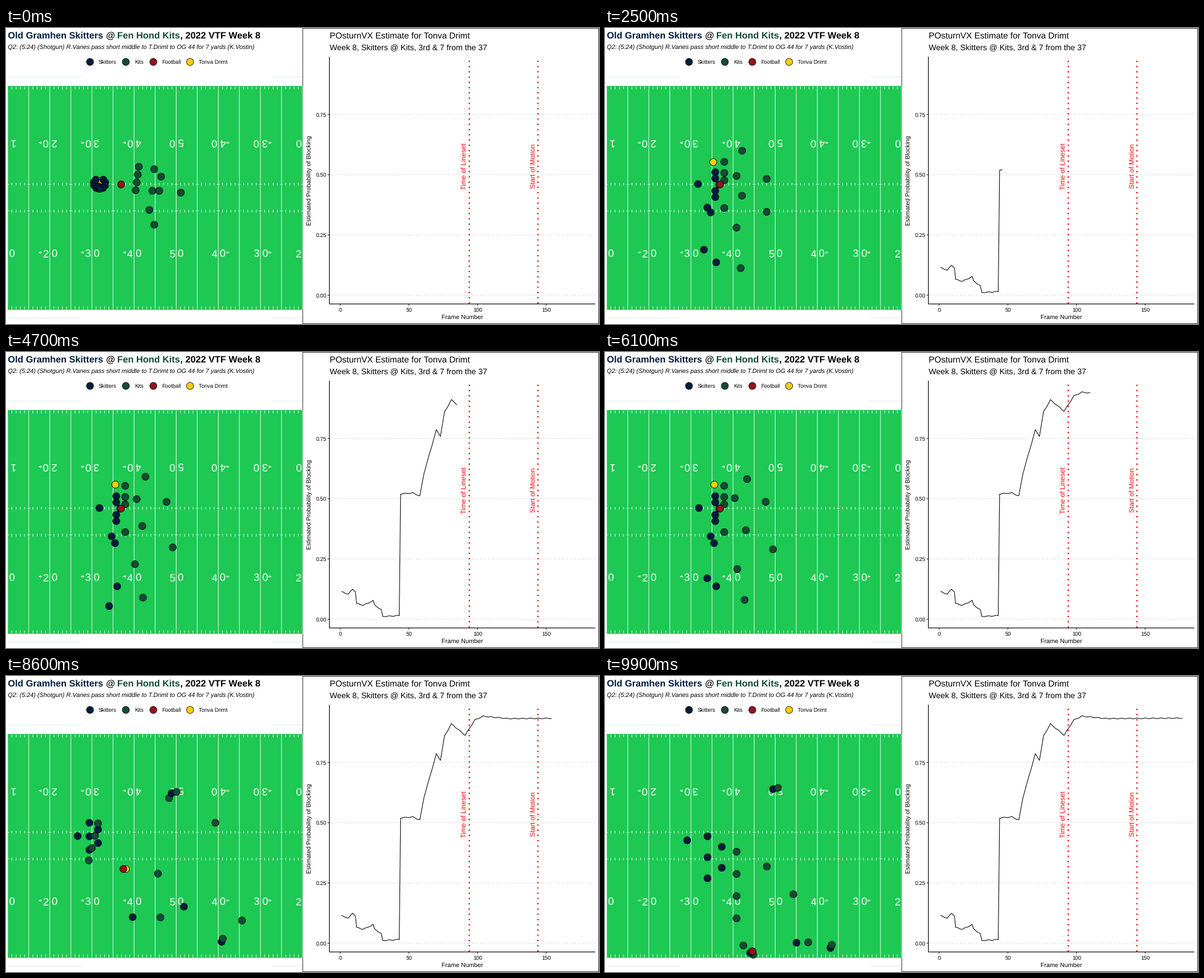
Write a matplotlib script that moves like this. It is 960 px wide and 480 px high and loops after 10000 ms.

```python
import numpy as np
import matplotlib.pyplot as plt
from matplotlib.animation import FuncAnimation
from matplotlib.patches import Polygon, Rectangle

W, H, DPI = 960, 480, 80
PT = 72 / DPI  # points per pixel
FRAMES = 100
F = np.arange(FRAMES)

NAVY, GREEN, RED, GOLD = "#001d3d", "#134b37", "#92141c", "#ffcc0a"
TURF, CHALK = "#1dc853", "#d9f7e2"

plt.rcParams["font.family"] = "Liberation Sans"
plt.rcParams["text.hinting"] = "none"
plt.rcParams["path.snap"] = False

fig = plt.figure(figsize=(W / DPI, H / DPI), dpi=DPI, facecolor="white")
ax = fig.add_axes([0, 0, 1, 1])
ax.set_xlim(0, W)
ax.set_ylim(H, 0)
ax.axis("off")


def text(x, y, s, px, color="black", ha="left", **kw):
    ax.text(x, y, s, fontsize=px * PT, color=color, ha=ha, va="baseline",
            rotation_mode="anchor", **kw)


def line(x, y, color="black", px=1.0, z=2, **kw):
    return ax.plot(x, y, color=color, lw=px * PT, zorder=z,
                   solid_capstyle="butt", **kw)[0]


def segments(x0, y0, x1, y1):
    """Many separate chalk strokes as one broken line."""
    x0, y0, x1, y1 = np.broadcast_arrays(x0, y0, x1, y1)
    gap = np.full(x0.shape, np.nan)
    line(np.column_stack([x0, x1, gap]).ravel(),
         np.column_stack([y0, y1, gap]).ravel(), CHALK)


def dots(xy, colors, z):
    x, y = np.transpose(xy)
    return ax.scatter(x, y, s=(11.4 * PT) ** 2, c=colors, edgecolors="black",
                      linewidths=0.75 * PT, zorder=z)


# ---------------------------------------------------------------- field
TOP, BOTTOM, LEFT, MID, YARD = 94, 457, 2.7, 275.5, 6.82


def draw_field():
    ax.add_patch(Rectangle((LEFT, TOP), 480 - LEFT, BOTTOM - TOP, fc=TURF, lw=0))
    for y in (79.5, 470.5):
        line([3, 122], [y, y], "#dcefee")
        line([430, 480], [y, y], "#dcefee")

    fives = MID + 5 * YARD * np.arange(-8, 7)
    segments(fives, TOP, fives, BOTTOM)
    yards = MID + YARD * np.array([k for k in range(-39, 30) if k % 5])
    for y in (TOP + 1, 251, 294.7, BOTTOM - 5.5):
        segments(yards, y, yards, y + 4.5)
    for y in (253.5, 296.5):
        segments(fives - 2.2, y, fives + 2.2, y)

    for k in range(-4, 4):
        x, s = MID + 10 * YARD * k, np.sign(k)
        digits = str(5 - abs(k)) + "0"
        for base, tip, turn in ((179.5, 186, 180), (371.5, 364, 0)):
            for dx, digit in zip((-6.8, 6.8), digits[::-1] if turn else digits):
                if 0 < x + dx < 480:
                    text(x + dx, base, digit, 17, "white", "center", rotation=turn)
            if k and 20 < x < 460:
                ax.add_patch(Polygon([(x + 18.5 * s, tip), (x + 13.5 * s, tip - 1.7),
                                      (x + 13.5 * s, tip + 1.7)], fc="white", lw=0,
                                     zorder=3))


def draw_header():
    bold = dict(fontweight="bold")
    text(3, 18, "Old Gramhen Skitters", 15, NAVY, **bold)
    text(161.4, 18, "@", 15, **bold)
    text(180.2, 18, "Fen Hond Kits", 15, GREEN, **bold)
    text(282.5, 18, ", 2022 VTF Week 8", 15, **bold)
    text(3, 34, "Q2: (5:24) (Shotgun) R.Vanes pass short middle to T.Drimt"
                " to OG 44 for 7 yards (K.Vostin)", 10, fontstyle="italic")
    keys = [(136, "Skitters", NAVY), (194, "Kits", GREEN),
            (238.5, "Football", RED), (298, "Tonva Drimt", GOLD)]
    dots([(x, 55) for x, _, _ in keys], [c for _, _, c in keys], 4)
    for x, name, _ in keys:
        text(x + 14, 58, name, 8.8)


# ---------------------------------------------------------------- chart
def cx(d):
    return 541 + 2.2232 * d


def cy(p):
    return 433.3 - 390.8 * p


def draw_chart():
    ax.add_patch(Rectangle((480.5, 0.5), 479, 479, fc="white", ec="#444444",
                           lw=PT, zorder=1))
    text(523.5, 17, "POsturnVX Estimate for Tonva Drimt", 14)
    text(523.5, 36, "Week 8, Skitters @ Kits, 3rd & 7 from the 37", 13)

    dotted = dict(linestyle=(0, (1, 3)))
    for p in (0, 0.25, 0.5, 0.75):
        line([523.5, 954], [cy(p)] * 2, "#bebebe", 1.07, **dotted)
        line([520.5, 523.5], [cy(p)] * 2, "#333333", 1.07)
        text(519, cy(p) + 3.3, f"{p:.2f}", 9, ha="right")
    for d in (0, 50, 100, 150):
        line([cx(d)] * 2, [447.5, 450.5], "#333333", 1.07)
        text(cx(d), 460, str(d), 9, ha="center")
    line([523.5, 523.5, 954], [46.5, 447.5, 447.5], px=1.07)
    text(738.7, 472, "Frame Number", 10, ha="center")
    text(494, 247, "Estimated Probability of Blocking", 10, ha="center", rotation=90)

    for d, label in ((94, "Time of Lineset"), (144, "Start of Motion")):
        line([cx(d)] * 2, [447, 53], "red", 2.13, 3, **dotted)
        text(cx(d) - 3.7, 224, label, 11.1, "red", "center", rotation=90)


def estimate():
    """Plateaus, jumps and climbs of the model output, with a slight wobble."""
    turns = [(1, .114), (6, .104), (9, .125), (11, .115), (12, .065), (17, .058),
             (24, .077), (25, .06), (30, .038), (31, .011), (43, .015), (44, .52),
             (53, .524), (58, .511), (61, .605), (70, .785), (73, .76), (76, .86),
             (81, .91), (91, .863), (98, .926), (104, .942), (122, .932), (177, .934)]
    d = np.arange(1, 178)
    return cx(d), cy(np.interp(d, *zip(*turns)) + 0.0015 * np.sin(1.1 * d))


# ---------------------------------------------------------------- motion
SNAP, DROP, CATCH, END = 67, 77, 86, 99


def ease(f0, f1):
    u = np.clip((F - f0) / (f1 - f0), 0, 1)[:, None]
    return u * u * (3 - 2 * u)


def glide(pts):
    """Monotone cubic from the snap through the drop and catch to the end."""
    keys, p = np.array([SNAP, DROP, CATCH, END]), np.array(pts, float)
    h = np.diff(keys)[:, None]
    d = np.diff(p, axis=0) / h
    a, b = d[:-1], d[1:]
    same = a * b > 0
    inner = np.where(same, 2 * a * b / np.where(same, a + b, 1), 0)
    m = np.vstack([0 * d[:1], inner, d[-1:]])
    i = np.clip(np.searchsorted(keys, F, "right") - 1, 0, len(h) - 1)
    u = (np.maximum(F, SNAP) - keys[i])[:, None] / h[i]
    smooth = u * u * (3 - 2 * u)
    return (p[i] + (p[i + 1] - p[i]) * smooth
            + h[i] * u * (1 - u) * ((1 - u) * m[i] - u * m[i + 1]))


paths, colors = [], []


def add(color, path):
    paths.append(path)
    colors.append(color)
    return path


def line_up(start, stance, walk=(0, 16), shift=(0, 0), when=(34, 61)):
    start, stance = np.array(start, float), np.array(stance, float)
    return start + (stance - start) * ease(*walk) + np.array(shift) * ease(*when)


def player(color, start, stance, *route, **kw):
    """Walk to the stance, maybe shift, then run a three-point route."""
    pre = line_up(start, stance, **kw)
    run = glide([pre[SNAP], *route])
    return add(color, np.where(F[:, None] < SNAP, pre, run))


def shadow(start, stance, man, offset, **kw):
    """Man coverage: close on a receiver until the catch, then stay with him."""
    pre = line_up(start, stance, **kw)
    u = np.clip((F - SNAP) / (CATCH - SNAP), 0, 1)[:, None] ** 2
    return add(GREEN, pre + (man + offset - pre) * u)


def huddle(i):
    """Spot i of nine on a ring open toward the top."""
    a = np.radians(-50 + 35 * i)
    return 151.5 + 9.5 * np.cos(a), 252.5 + 8.5 * np.sin(a)


def blocker(k):
    """Offensive lineman k = -2..2, counted from the center."""
    odd = k % 2
    player(NAVY, huddle(k + 2), (185 if k == 0 else 178.5, 254 + 10.1 * k),
           (157 + 6 * odd, 254 + 8.5 * k), (135 + 14 * odd, 260 + 11 * k),
           (166 + 23 * odd, 294 + 17 * k))


def rusher(j, y):
    """Defensive lineman j = 0..3, set at height y."""
    player(GREEN, (215 - 1.7 * j, 225 + 12.7 * j), (193, y),
           (172 - 3 * j, 238 + 11 * j), (149 - 5 * j, 239 + 20 * j),
           (213, 285 + 36 * j), walk=(0, 26))


def ball_path(passer, catcher):
    spot = np.array([186.3, 253.7])
    held = spot + (passer - spot) * np.clip((F - SNAP) / 4, 0, 1)[:, None]
    lead = np.interp(F, [CATCH, END], [-4, 0.8])
    caught = catcher + np.column_stack([lead, 0 * F])
    u = np.clip((F - 82) / (CATCH - 82), 0, 1)[:, None]
    start, goal = held[np.minimum(F, 82)], caught[np.maximum(F, CATCH)]
    return start + (goal - start) * u


def draw_players():
    late, back = (10, 34), dict(shift=(8, 7))
    target = player(GOLD, (153, 248), (177, 215), (183.5, 235), (194, 313),
                    (238, 446.5), walk=(10, 28))
    # zone defenders
    player(GREEN, (240, 229), (222, 199), (243, 212), (264, 198), (262, 309), **back)
    player(GREEN, (283, 267), (260, 243), (288, 236), (339, 238), (305, 354),
           walk=(0, 30))
    player(GREEN, (237, 264), (214, 276), (238, 301), (246, 320.5), (224, 437),
           walk=(14, 32), shift=(14, 13))
    player(GREEN, (248, 264), (268, 314), (316.5, 350), (382, 396.5), (329, 432),
           walk=late, shift=(4, 6))
    player(GREEN, (232, 295), (204, 337), (219, 342), (250, 391.5), (240, 452),
           walk=late, shift=(10, 15))
    # receivers and their cover men
    cross = player(NAVY, huddle(5), (171, 299), (220, 281), (268, 190), (272, 183.5))
    shadow((251, 241), (213, 240), cross, (8, -2), shift=(-3, -3))
    sideline = player(NAVY, huddle(6), (180, 380), (227, 400.5), (349, 431),
                      (365, 441))
    shadow((240, 319), (218, 395), sideline, (2, -5), walk=(0, 30), **back)
    player(NAVY, huddle(7), (176.5, 310), (226, 329), (288, 374), (310, 432.5),
           walk=late)
    player(NAVY, huddle(8), (167, 412), (179, 301), (205, 391), (235, 449),
           walk=late, shift=(-3, -90), when=(55, SNAP))
    passer = player(NAVY, (150, 257), (150.5, 253), (125.5, 251.5), (116, 259.5),
                    (133, 266.5), shift=(1.5, 0))
    for k in range(-2, 3):
        blocker(k)
    for j, y in enumerate((217, 235, 247, 292)):
        rusher(j, y)
    add(RED, ball_path(passer, target))
    return dots([p[0] for p in paths], colors, 5)


draw_field()
draw_header()
draw_chart()
marks = draw_players()
xs, ys = estimate()
curve = line([], [], "#111111", 1.07, 4)
tracks = np.stack(paths, axis=1)


def update(f):
    marks.set_offsets(tracks[f])
    n = 1 + int(np.ceil(f * 176 / 99))
    curve.set_data(xs[:n], ys[:n])
    return marks, curve


anim = FuncAnimation(fig, update, frames=FRAMES, interval=100, repeat=True,
                     repeat_delay=0)
plt.show()
```
